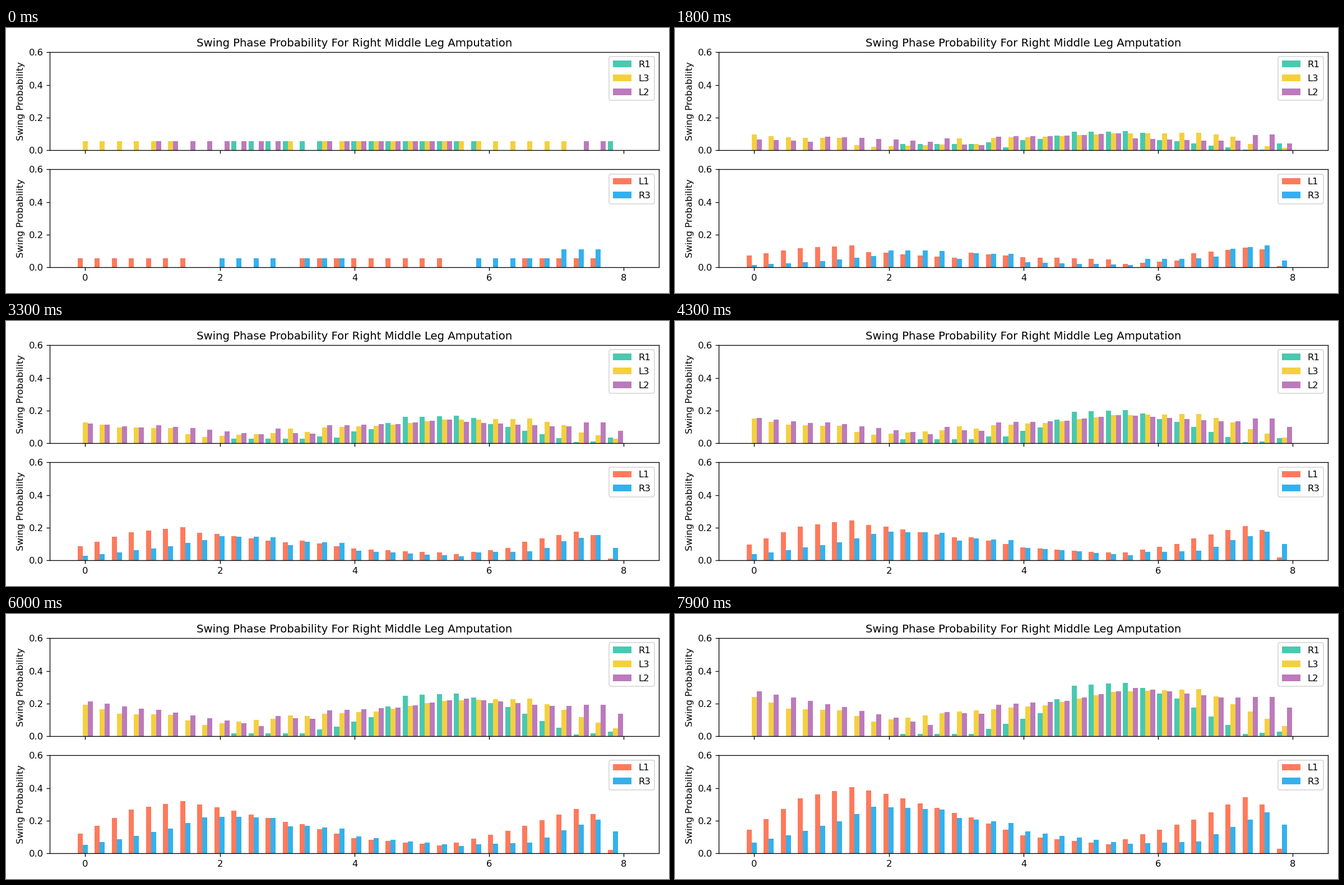
Write a matplotlib script that moves like this. It is 1183 px wide and 473 px high and loops after 8 s.

```python
import numpy as np
import matplotlib.pyplot as plt
from matplotlib.animation import FuncAnimation

DPI = 118.25
STAGE_W, STAGE_H = 1183, 473
BINS = np.arange(32)
BIN_STEP, BAR_WIDTH = 16 / 63, 0.075
TICKS, INTERVAL = 80, 100
HOLD = 2                        # extra ticks on the opening state
LAST_STEP = TICKS - 1 - HOLD
FIRST_STRIDES = 18

# label, colour, slot beside the bin centre,
# bin spans of the first swing, key points (bin, probability) of the last state
TOP_LEGS = [
    ("R1", "#48c9b0", -1, [(9, 15), (16, 24), (31, 32)],
     [(8, 0), (9, .013), (13, .013), (17, .14), (19, .311), (22, .328),
      (25, .23), (29, .015), (31, .028)]),
    ("L3", "#f4d03f", 0, [(0, 6), (12, 13), (14, 29)],
     [(0, .24), (2, .17), (5, .158), (7, .09), (12, .153), (17, .188),
      (21, .272), (26, .288), (31, .062)]),
    ("L2", "#bc7abc", 1, [(4, 12), (14, 22), (29, 31)],
     [(0, .275), (5, .178), (10, .07), (11, .149), (13, .137), (14, .194),
      (18, .216), (22, .297), (27, .238), (30, .24), (31, .176)]),
]
BOTTOM_LEGS = [
    ("L1", "#ff7a5c", -1, [(0, 7), (13, 22), (26, 31)],
     [(0, .145), (3, .337), (6, .405), (8, .366), (13, .22), (16, .11),
      (21, .055), (26, .208), (29, .343), (30, .3), (31, .03)]),
    ("R3", "#33b1ee", 0, [(8, 12), (13, 16), (23, 31), (28, 31)],
     [(0, .068), (2, .111), (5, .196), (7, .285), (11, .27), (12, .216),
      (15, .188), (16, .135), (22, .058), (26, .074), (30, .25), (31, .175)]),
]


def first_share(step):
    """Weight of the first swing as more strides enter the average."""
    strides = FIRST_STRIDES + 0.35 * step + 0.006 * step ** 2
    return FIRST_STRIDES / strides


def growth(step):
    return (step / LAST_STEP) ** 0.9


def add_leg(ax, label, color, slot, spans, points):
    bars = ax.bar(BINS * BIN_STEP + slot * BAR_WIDTH, 0 * BINS, BAR_WIDTH,
                  color=color, label=label)
    first = sum((BINS >= a) & (BINS < b) for a, b in spans) / FIRST_STRIDES
    gained = np.interp(BINS, *zip(*points)) - first_share(LAST_STEP) * first
    return bars, first, gained


fig, (top, bottom) = plt.subplots(2, 1, sharex=True, dpi=DPI,
                                  figsize=(STAGE_W / DPI, STAGE_H / DPI))
fig.subplots_adjust(left=78.4 / STAGE_W, right=1165.4 / STAGE_W,
                    top=1 - 43.2 / STAGE_H, bottom=1 - 427.4 / STAGE_H,
                    hspace=34.1 / 175.05)

series = []
for ax, legs in ((top, TOP_LEGS), (bottom, BOTTOM_LEGS)):
    series += [add_leg(ax, *leg) for leg in legs]
    ax.set(xlim=(-0.52375, 8.52375), ylim=(0, 0.6), ylabel="Swing Probability",
           xticks=range(0, 9, 2), yticks=[0, 0.2, 0.4, 0.6])
    ax.legend(loc="upper right", labelspacing=0.6)
top.set_title("Swing Phase Probability For Right Middle Leg Amputation")


def update(tick):
    step = max(0, tick - HOLD)
    for bars, first, gained in series:
        heights = first_share(step) * first + growth(step) * gained
        for bar, height in zip(bars, heights):
            bar.set_height(max(0, height))
    return [bar for bars, *_ in series for bar in bars]


anim = FuncAnimation(fig, update, frames=TICKS, interval=INTERVAL,
                     repeat=True, repeat_delay=0)
plt.show()
```
